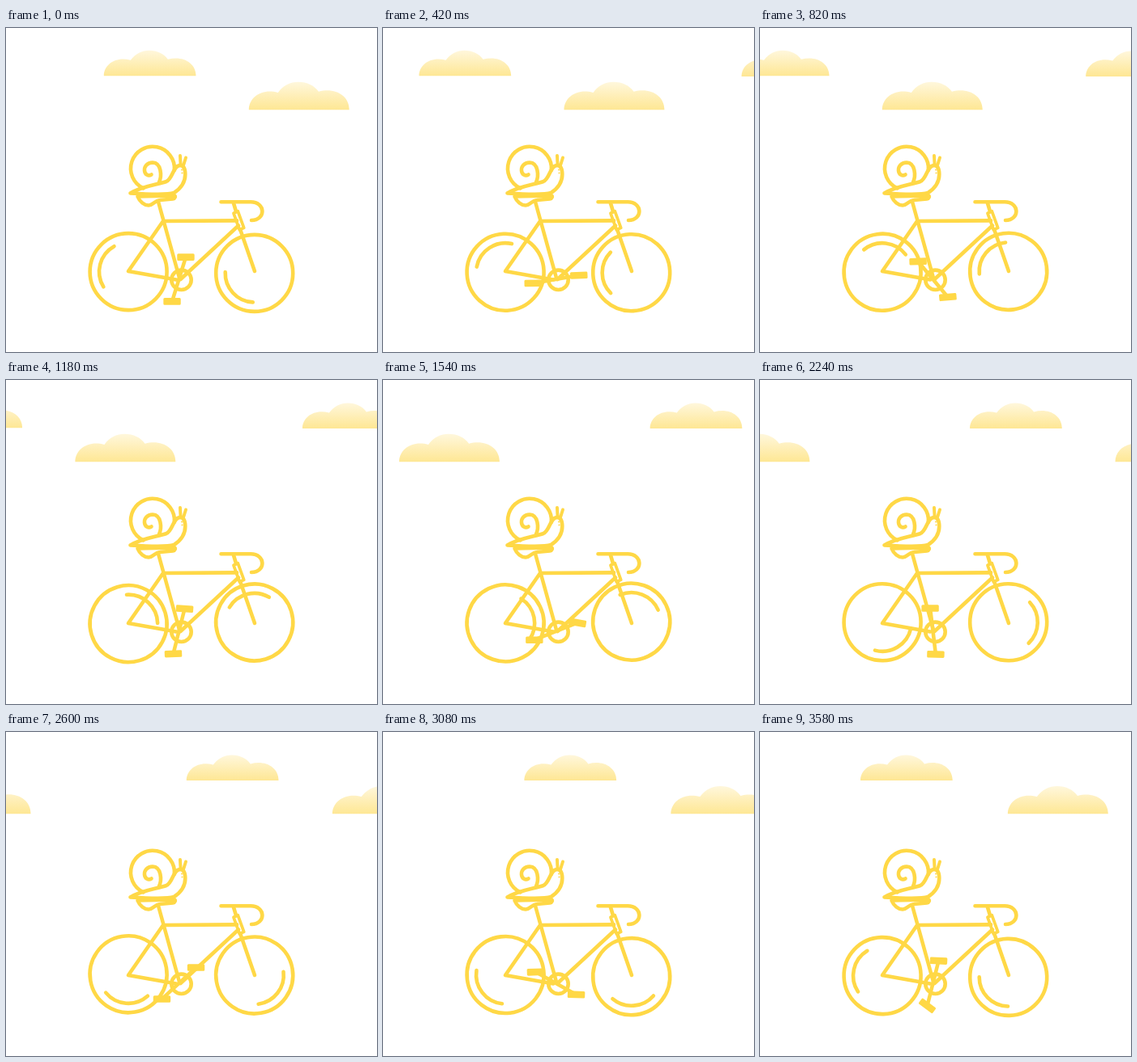
Write an HTML page that moves like this. It is 458x401 px and loops after 3.6 s.

```html
<!DOCTYPE html>
<html>
<head>
<meta charset="utf-8">
<style>
  html, body { margin: 0; height: 100%; overflow: hidden; background: #fff; }
  svg { display: block; }
  .line { fill: none; stroke: #ffd846; stroke-width: 4.6; stroke-linecap: round; stroke-linejoin: round; }
  .solid { fill: #ffd846; stroke: none; }
</style>
</head>
<body>
<svg width="458" height="401" viewBox="0 0 458 401">
  <defs>
    <linearGradient id="sky" x1="0" y1="0" x2="0" y2="1">
      <stop offset="0" stop-color="#fff7dc"/>
      <stop offset="1" stop-color="#fee794"/>
    </linearGradient>
    <path id="cloud" fill="url(#sky)" d="M0 31.5C0 17 15 7 33 12C39 4 47 0 56 0C66 0 74 4 79 11C97 6 113.7 15 113.7 31.5Z"/>
  </defs>

  <use id="smallOut" href="#cloud"/>
  <use id="smallIn" href="#cloud"/>
  <use id="largeOut" href="#cloud"/>
  <use id="largeIn" href="#cloud"/>

  <g class="line">
    <g id="rear">
      <circle r="47.5"/>
      <path d="M-30.7 18.8A36 36 0 0 1 -17.7 -31.4"/>
    </g>
    <g id="front">
      <circle r="47.5"/>
      <path d="M-1.9 36A36 36 0 0 1 -36 -1.3"/>
    </g>

    <!-- frame, fork and handlebar -->
    <path d="M188 215L214.5 311M194 239L285 238.4M287 244.5L215.5 311M194 239L151 301L210 311.5M289 249L307 301"/>
    <path d="M281 217L284 227"/>
    <path stroke-width="3.8" d="M281 229.3L286.3 226.8L293.7 247.3L288.3 249.8Z"/>
    <path d="M265.5 215.3H302C321 215.3 321 238 303 238"/>

    <!-- crank -->
    <circle cx="216.5" cy="311.8" r="12.2"/>
    <path id="arm" d="M-26 0H26"/>
    <rect id="pedalA" class="solid" x="-10.7" y="-4.3" width="21.4" height="8.6" rx="1.5"/>
    <rect id="pedalB" class="solid" x="-10.7" y="-4.3" width="21.4" height="8.6" rx="1.5"/>

    <!-- saddle -->
    <path d="M162.5 208.5C165 215 171 219.5 176 219.5C182 219.5 183 213.5 190 213L206 211.5C209 211 209.5 208 208 207.5Z"/>

    <!-- snail -->
    <path d="M169.6 198.3A27 27 0 1 1 207.9 176"/>
    <path d="M189 191C192.5 183 192 167 181 166.5C174 166.5 170.5 172 171 176.5C171.5 182 176 183.5 179.5 181.5"/>
    <path d="M153.5 204.5C167 196 186 194 198 190C206 186.5 206 171 214.5 170C219 170 221.3 174 221.3 181C221.3 192 215 199 207.5 204C200 206.5 178 206 153.5 204.5Z"/>
    <path stroke-width="4" d="M215.5 168L215 158M219 170L222 160.5"/>
    <g class="solid">
      <circle cx="217" cy="175.5" r="1"/>
      <circle cx="219.5" cy="176" r=".8"/>
      <circle cx="217.5" cy="179.5" r="1"/>
    </g>
  </g>
</svg>
<script>
  const LOOP = 3600;
  const CRANK = { x: 213.5, y: 311, r: 28.7 };
  const SLOW_AT = 1775;
  const tiltA = [[0, 0], [820, -5], [1540, 0], [2600, 0], [3080, 2], [3600, 38]];
  const tiltB = [[0, 0], [820, -2], [1540, 10], [1860, 3], [2600, 0], [3080, -2], [3600, 3]];

  const sinDeg = a => Math.sin(a * Math.PI / 180);
  const place = (id, x, y, extra = '') =>
    document.getElementById(id).setAttribute('transform', `translate(${x} ${y}) ${extra}`);

  function sample(keys, t) {
    const i = keys.findIndex(k => k[0] > t);
    const [t0, v0] = keys[i - 1], [t1, v1] = keys[i];
    return v0 + (v1 - v0) * (t - t0) / (t1 - t0);
  }

  function pedal(id, angle, tilt) {
    place(id, CRANK.x + CRANK.r * sinDeg(angle + 90), CRANK.y + CRANK.r * sinDeg(angle), `rotate(${tilt})`);
  }

  // A wheel turns about its hub while bobbing up and down once per turn.
  function wheel(id, x, y, bob, phase, turn) {
    place(id, x, y + bob * sinDeg(turn + phase), `rotate(${turn})`);
  }

  function draw(t) {
    place('smallOut', 121 - 0.1817 * t, 27.8);
    place('smallIn', 485 - 0.1008 * t, 28.5);
    const slow = Math.max(0, t - SLOW_AT);
    place('largeOut', 300 - 0.1817 * (t - slow) - 0.0858 * slow, 66.8, 'scale(1.09)');
    place('largeIn', 660.4 - 0.099 * t, 67, 'scale(1.09)');

    const turn = 360 * t / LOOP;
    wheel('rear', 151.1, 301, 1.3, 30, turn);
    wheel('front', 306.7, 301.2, 2.2, 95, turn);

    const crank = -73 + 540 * t / LOOP;
    place('arm', CRANK.x, CRANK.y, `rotate(${crank})`);
    pedal('pedalA', crank, sample(tiltA, t));
    pedal('pedalB', crank + 180, sample(tiltB, t));
  }

  function tick() {
    draw(performance.now() % LOOP);
    requestAnimationFrame(tick);
  }
  tick();
</script>
</body>
</html>
```
